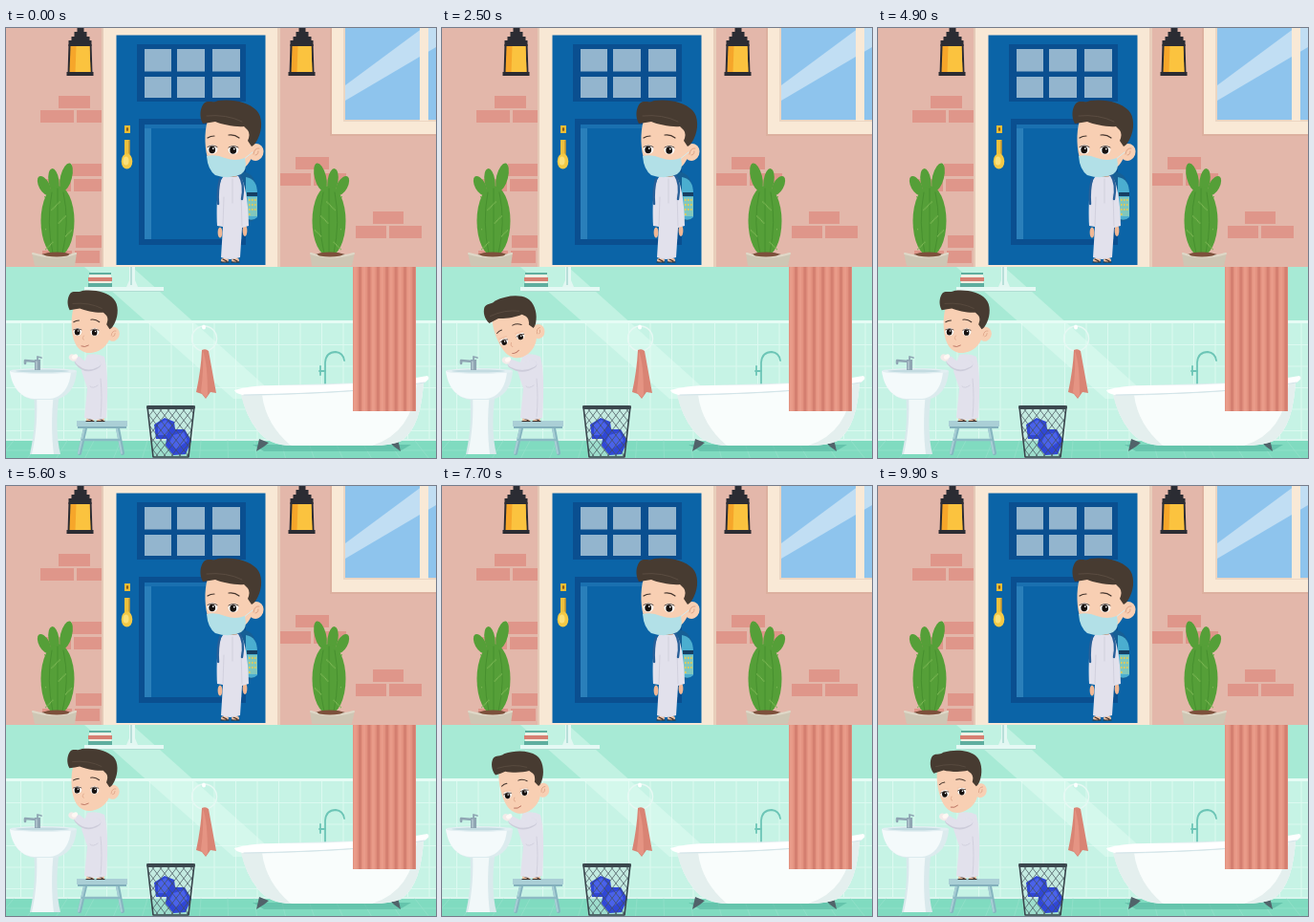
Write an HTML page with a canvas that moves like this. It is 450 px wide and 450 px high and loops after 10 s.

```html
<!DOCTYPE html>
<html lang="en">
<head>
<meta charset="utf-8">
<title>Morning routine</title>
<style>
html, body { margin: 0; width: 100%; height: 100%; overflow: hidden; background: #e3b7aa; }
canvas { display: block; width: 450px; height: 450px; }
</style>
</head>
<body>
<canvas id="stage" width="450" height="450"></canvas>
<script>
const LOOP = 10000, STEP = 100, CYCLE = 4000;
const SKIN = '#f8cfb3', HAIR = '#473b31', ROBE = '#e2e1ec', FOLD = '#cdccda';
const BLUE = '#0b64a7', NAVY = '#0a4f90';
const view = document.getElementById('stage').getContext('2d');
const scene = document.createElement('canvas');
scene.width = scene.height = 450;
let c = scene.getContext('2d');

function box(color, x, y, w, h) {
  c.fillStyle = color;
  c.fillRect(x, y, w, h);
}
function fill(color, d) {
  c.fillStyle = color;
  c.fill(new Path2D(d));
}
function line(color, width, d) {
  c.strokeStyle = color;
  c.lineWidth = width;
  c.lineCap = c.lineJoin = 'round';
  c.stroke(new Path2D(d));
}
function oval(color, x, y, rx, ry, turn = 0) {
  c.fillStyle = color;
  c.beginPath();
  c.ellipse(x, y, rx, ry, turn, 0, Math.PI * 2);
  c.fill();
}
function group(draw) {
  c.save();
  draw();
  c.restore();
}
function clip(d) {
  c.clip(new Path2D(d));
}

function brickRow(y, ...spans) {
  for (const [x, w] of spans) box('#df968a', x, y, w, 13);
}

function lamp(x) {
  group(() => {
    c.translate(x, 0);
    fill('#2b2c33', 'M-3 0H4V4H7V9H10V13H12V19H-12V13H-9V9H-6V4H-3Z');
    fill('#2b2c33', 'M-12 17H12L13 48H-13Z');
    fill('#f6a62a', 'M-10 19H10L11 46H-11Z');
    fill('#fbc33f', 'M-4 19H10L11 46H-5Z');
    box('#2b2c33', -14, 46, 28, 4);
  });
}

function cactus(flip) {
  group(() => {
    if (flip) c.transform(-1, 0, 0, 1, 392, 0);
    const green = '#559f38';
    oval(green, 40, 165, 5.5, 11, -0.5);
    oval(green, 50, 160, 5.5, 13, -0.15);
    oval(green, 63, 156, 6, 15, 0.25);
    oval(green, 54, 202, 17.5, 37);
    line('#47902f', 1, 'M48 172Q42 203 49 236M54 168V238M60 172Q67 203 59 236');
    c.fillStyle = '#7cb655';
    for (let i = 0; i < 30; i++) c.fillRect(40 + (i * 7.3) % 28, 176 + (i * 13.7) % 56, 1, 1.5);
    oval('#6f4a38', 53, 238, 17, 3);
    fill('#cec6b4', 'M27 235Q52 243 74 235L72 249H30Z');
    line('#e0d8c8', 2, 'M28 236Q52 243 73 236');
    oval('#7d503b', 53, 237, 13, 2.5);
  });
}

function door() {
  box('#f8e8d5', 101, 0, 185, 250);
  box('#e5c9b7', 100, 0, 2, 250);
  box('#e8cebb', 284, 0, 3, 250);
  box(BLUE, 115.5, 7.5, 156, 240.5);
  box(NAVY, 137, 17, 114, 60);
  for (const [x, w] of [[145, 28], [179, 29], [216, 29]]) {
    box('#93b5ce', x, 22, w, 23.5);
    box('#93b5ce', x, 51, w, 22);
  }
  box(NAVY, 139, 95, 112, 132);
  box(BLUE, 145, 101, 102, 120);
  box('#2a7fba', 145, 101, 7, 120);
  box('#1a70b0', 145, 101, 102, 4);
  box('#eebd36', 124, 102, 6, 8);
  oval('#8e5c17', 127, 106, 1.2, 2);
  box('#efc03c', 124, 117, 5.5, 18);
  oval('#f4c945', 126.5, 139.5, 5.8, 8);
  oval('#fbe17a', 125.5, 139, 3, 4.5);
  line('#b98527', 1, 'M129 118V131');
}

function houseWindow() {
  box('#dcb09f', 339, 0, 111, 113);
  box('#f9e9d6', 341, 0, 109, 111);
  box('#ecd6c2', 353, 0, 97, 98);
  box('#f9e9d6', 433, 0, 9, 97);
  group(() => {
    clip('M355 0H433V96H355ZM442 0H450V96H442Z');
    box('#8ec4ed', 355, 0, 95, 97);
    fill('#c1def3', 'M355 60L436 0H450V20L355 76Z');
  });
}

function house() {
  box('#e3b7aa', 0, 0, 450, 250);
  brickRow(71, [55, 33]);
  brickRow(86, [36, 35], [74, 27]);
  brickRow(142, [69, 32]);
  brickRow(158, [42, 26], [71, 30]);
  brickRow(217, [73, 28]);
  brickRow(233, [38, 31], [72, 26]);
  brickRow(135, [303, 35]);
  brickRow(152, [287, 32], [322, 34]);
  brickRow(192, [384, 32]);
  brickRow(207, [366, 32], [401, 34]);
  door();
  houseWindow();
  lamp(77.5);
  lamp(309.5);
  cactus(false);
  cactus(true);
}

function eye(x, y, d) {
  oval('#fffdfa', x, y + 0.5, 5.4, 4.8);
  oval('#16110f', x - 0.3, y + 1 + d * 1.2, 3.4, 3.8 - d * 0.5);
  oval('#fff', x + 0.8, y - 0.4 + d * 1.5, 0.9, 0.9);
  const lid = y - 4 + d * 2;
  if (d > 0.05) box('#f3c5a8', x - 5.5, y - 5, 11, d * 2.5);
  line('#3c2d27', 0.9, `M${x - 5} ${lid + 2}Q${x} ${lid - 1} ${x + 5} ${lid + 2}`);
}

function head(mask, d = 0) {
  oval(SKIN, 261.5, 130, 8, 9, 0.35);
  line('#dda488', 1, 'M259 132Q260 125 265 126M261 133Q264 133 264 129');
  fill(SKIN, 'M211 97C207 109 208 129 212 139C216 150 226 155 235 153C247 151 255 143 258 133L260 103L240 89Z');
  fill(HAIR, 'M206 100C202 93 203 84 207 79C211 75 217 79 222 76C238 74 254 78 262 86C269 93 268 107 264 115Q261 122 257 124L253 118Q256 111 253 107L249 103C241 104 226 101 219 98L213 99Z');
  line('#5d4f43', 0.9, 'M210 92Q231 90 247 98');
  line('#44352d', 1.2, 'M211 115Q214 113 218 113M233 112Q239 111 244 115');
  eye(216, 126.5, d);
  eye(238, 127, d);
  if (mask) {
    line('#d3ecef', 1, 'M248 138L258 130');
    fill('#b2e0e7', 'M210 134Q220 132 229 136Q240 140 250 136Q253 149 246 153Q234 159 219 154Q211 148 210 134Z');
  } else {
    line('#e0a88c', 1, 'M224 132Q221 136 224 137');
    line('#b8705f', 1.1, 'M221 145Q225 147 230 144');
  }
}

function sandals(y, ...xs) {
  for (const x of xs) {
    oval('#f0c2a3', x, y, 4, 2.2);
    line('#3d302b', 1.2, `M${x - 4} ${y + 2}H${x + 4}M${x - 2} ${y - 1}L${x + 2} ${y + 1}`);
  }
}

function schoolBoy() {
  fill('#165f95', 'M243 151Q258 148 262 166V198Q258 205 248 201Z');
  fill('#4baed0', 'M251 156Q263 158 263 173V198Q258 203 251 199Z');
  box('#173f63', 252, 172, 11, 4);
  box('#80c7bd', 253, 177, 10, 20);
  c.fillStyle = '#e0ca5a';
  for (let i = 0; i < 10; i++) c.fillRect(254 + i % 3 * 3, 179 + Math.floor(i / 3) * 5, 1.6, 2);
  box('#bd8b70', 228, 148, 14, 9);
  oval('#f0b895', 224, 214, 2.4, 5.5);
  oval('#f0b895', 250, 212, 2.4, 6);
  sandals(243, 229, 240);
  fill(ROBE, 'M229 154Q239 158 244 154C251 160 254 188 254 207L247 209L245 240Q234 244 225 240L227 208L221 207C220 183 221 160 229 154Z');
  line(FOLD, 0.8, 'M228 177L227 207M246 174L247 207M237 158V183');
  line('#285f98', 2.4, 'M224 158Q221 169 222 184');
  line('#285f98', 2.4, 'M244 154Q250 163 247 179');
  head(true);
}

function tiles() {
  box('#a7ead5', 0, 250, 450, 200);
  box('#c6f3e5', 0, 307, 450, 124);
  c.fillStyle = '#dcf9f0';
  for (let x = 15; x < 450; x += 22.5) c.fillRect(x, 309, 1, 121);
  for (let y = 331; y < 430; y += 22.5) c.fillRect(0, y, 450, 1);
  fill('rgba(235,255,247,.38)', 'M82 250H132L286 388H238Z');
  box('#e6fcf5', 0, 306, 450, 3);
  box('#80dbc0', 0, 431, 450, 19);
  box('#daf6ee', 0, 430, 450, 2);
  let lines = 'M0 442H450';
  for (let x = -20; x < 480; x += 28) lines += `M${x} 432L${x + (x - 225) * 0.07} 450`;
  line('#93e0ca', 0.8, lines);
}

function shelf() {
  box('#e5f9f4', 82, 271, 83, 4);
  box('#b0ddd2', 84, 275, 81, 1);
  fill('#e3f7f2', 'M129 250H135V264L138 271H126L129 264Z');
  box('#b7dfd9', 130, 250, 2, 19);
  box('#5fae9f', 87, 256, 23, 2);
  box('#eef1e6', 87, 258, 23, 3);
  box('#d67f72', 86, 261, 25, 4);
  box('#f0eee2', 87, 265, 23, 2);
  box('#5fae9f', 86, 267, 25, 4);
}

function sink() {
  fill('#d9e9ec', 'M29 382H56C52 406 53 430 57 446H25C30 424 31 404 29 382Z');
  fill('#f1f8f9', 'M32 382H50C47 408 48 429 50 446H27C32 425 33 404 32 382Z');
  fill('#dcebee', 'M4 359H74C73 375 65 388 49 389H29C14 387 6 374 4 359Z');
  fill('#f4fafb', 'M4 359H68C67 375 59 387 46 388H29C14 387 6 374 4 359Z');
  oval('#e2eff2', 39, 359, 35, 3);
  oval('#c3dbe1', 38, 359, 28, 1.5);
  box('#8fa5b3', 30, 347, 6, 11);
  line('#8fa5b3', 2.6, 'M32 349L20 348V351');
  line('#8fa5b3', 1.8, 'M33 347V344L37 345');
  line('#c6d8df', 1, 'M32 349V357');
}

function stool() {
  line('#86b5c0', 4, 'M83 419L77 445M117 419L122 445');
  line('#a8ced5', 2, 'M82 419L76 445M116 419L121 445');
  line('#8cbac4', 2.5, 'M80 431H119');
  box('#83b0bc', 75, 416, 51, 3);
  box('#aacfd6', 74, 411, 53, 6);
}

function bin() {
  fill('rgba(190,222,218,.45)', 'M147 395H198L192 450H153Z');
  fill('#3047d6', 'M155 415L166 408L176 412L177 420L187 420L194 432L188 446L175 447L167 437L168 430L157 430Z');
  fill('#4a62ea', 'M159 415L167 410L173 416L168 426L159 426ZM175 426L186 423L190 432L178 441L171 434Z');
  group(() => {
    clip('M148 395H197L191 448H154Z');
    let mesh = '';
    for (let x = 90; x < 260; x += 8) mesh += `M${x} 390l48 62M${x} 390l-48 62`;
    line('#435058', 0.7, mesh);
  });
  line('#36434a', 1.6, 'M148 396L154 449H191L197 396');
  line('#3b474e', 4, 'M149 397H196');
}

function towel() {
  c.strokeStyle = '#e6f8f3';
  c.lineWidth = 1.5;
  c.beginPath();
  c.arc(207.5, 325, 13, 0, Math.PI * 2);
  c.stroke();
  oval('#fff', 207, 313, 2, 2.5);
  fill('#d98474', 'M205 337Q209 335 212 338Q216 360 220 382L214 381L209 388L205 383L199 381Q204 358 205 337Z');
  fill('#e59483', 'M206 338Q211 350 211 384L209 387L204 381Q207 356 206 338Z');
}

function tub() {
  line('#6cc5b6', 1.8, 'M334 373V350Q335 339 345 339Q353 340 354 348');
  line('#6cc5b6', 1.8, 'M328 359H334M329 354V363');
  fill('rgba(60,160,140,.4)', 'M258 436H424L412 443H270Z');
  fill('#51636a', 'M265 430L275 434L270 438L262 443ZM402 434L410 430L413 443L406 438Z');
  fill('#f9fdfc', 'M246 382Q338 383 437 368Q435 417 414 432Q404 437 383 437H300Q275 437 263 421Q251 406 246 382Z');
  fill('#e4efee', 'M246 384L268 384Q272 415 298 437Q275 437 263 421Q251 406 246 384ZM430 370L437 368Q435 417 414 432Q404 437 383 437Q426 424 430 370Z');
  fill('#e1edef', 'M241 380Q252 374 281 374L376 371Q420 371 440 365L439 371Q399 381 252 385Z');
  fill('#fff', 'M239 379Q255 374 283 374Q388 374 441 364Q445 367 438 371Q385 381 249 384Q240 383 239 379Z');
  line('#d2e4e8', 1, 'M249 384Q376 382 438 371');
}

function curtain() {
  box('#e39280', 363, 250, 66, 151);
  for (let x = 364; x < 429; x += 9.4) {
    box('#d47f70', x + 5, 250, 3, 151);
    box('#e99b89', x, 250, 3, 151);
  }
}

function bathroom() {
  group(() => {
    c.beginPath();
    c.rect(0, 250, 450, 200);
    c.clip();
    tiles();
    shelf();
    towel();
    tub();
    curtain();
    sink();
    stool();
    bin();
  });
}

function smooth(t, a, b) {
  const p = Math.min(1, Math.max(0, (t - a) / (b - a)));
  return p * p * (3 - 2 * p);
}

// 0 = upright, 1 = leaning over the basin
function lean(t) {
  let d = 0;
  for (let s = 0; s < LOOP; s += CYCLE) {
    d += smooth(t, s + 1550, s + 2300) - smooth(t, s + 3300, s + 4200);
  }
  return d;
}

function washingBoy(t) {
  const d = lean(t), rub = Math.sin(t / 1000 * Math.PI * 2) * 0.6;
  const hx = 70 - d * 3 + rub, hy = 345 + d * 3;
  sandals(409.5, 88, 99);
  fill(ROBE, 'M85 342Q96 340 103 344Q108 361 105 408Q94 412 82 408L85 377L79 359Z');
  line(FOLD, 0.8, 'M99 367Q101 386 99 407M88 375Q91 378 96 374');
  group(() => {
    c.translate(99 - d, 349);
    c.rotate(-d * 0.34);
    c.translate(-99, -349);
    c.translate(65, 275);
    c.scale(0.82, 0.84);
    c.translate(-204, -76);
    head(false, d);
  });
  line(FOLD, 8.5, `M95 352Q84 359 ${hx + 6} ${hy + 4}`);
  line(ROBE, 7.8, `M95 351Q84 357 ${hx + 6} ${hy + 3}`);
  oval('#f3ebe9', hx, hy, 4.4, 3.4, 0.5);
  oval('#fff8f4', hx + 2 - rub, hy - 1, 3.3, 2.4, -0.5);
}

house();
schoolBoy();
bathroom();
c = view;

function frame(now) {
  const t = Math.floor((now % LOOP) / STEP) * STEP;
  c.drawImage(scene, 0, 0);
  washingBoy(t);
  requestAnimationFrame(frame);
}
frame(0);
</script>
</body>
</html>
```
